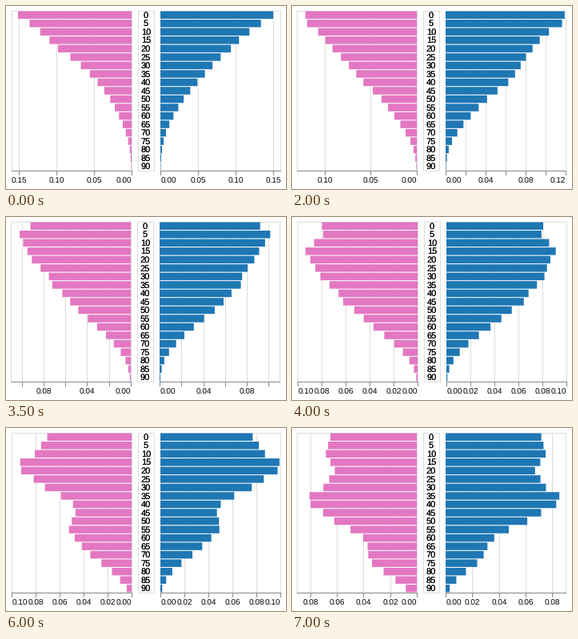
Recreate the animation shown at these times as a matplotlib script. Size 350 px wide and 229 px high, loop 7.5 s.

```python
import math

import matplotlib.pyplot as plt
import numpy as np
from matplotlib.animation import FuncAnimation
from matplotlib.patches import Rectangle

W, H, DPI = 350, 229, 64
TOP, HEIGHT, WIDTH, GAP, MIDDLE = 6, 200, 150, 8, 20
PINK, BLUE, GRID, AXIS = "#e377c2", "#1f77b4", "#dddddd", "#888888"
YEARS = [1850, 1860, 1870, 1880, *range(1900, 2001, 10)]
AGES = np.arange(0, 95, 5)
ROW = HEIGHT / len(AGES)
LABEL_W = 19.46  # width of "0.00" at 10 px

# Key points of cohort size by birth year, in thousands of women
COHORTS = {
    1770: 150, 1800: 360, 1830: 1070, 1850: 1650, 1860: 2250, 1870: 2760,
    1880: 3400, 1890: 4000, 1895: 4480, 1900: 4620, 1910: 5550, 1925: 6400,
    1930: 5950, 1935: 5500, 1940: 5700, 1945: 6850, 1950: 8400, 1960: 10700,
    1965: 10800, 1970: 9400, 1980: 8250, 1990: 9150, 2000: 8700,
}


def bell(x, center, width):
    return np.exp(-(((x - center) / width) ** 2) / 2)


def women_by_age(year):
    """Cohort size times Weibull survival, which improves after 1930."""
    born = np.exp(np.interp(year - AGES, list(COHORTS), np.log(list(COHORTS.values()))))
    gain = max(year - 1930, 0)
    alive = np.exp(-((AGES / (72 + 0.186 * gain)) ** (5.2 + 0.045 * gain)))
    missed = 0.06 * max(0, 1 - abs(year - 1930) / 60)
    return born * alive * (1 - missed * np.exp(-AGES / 8))


def sex_ratio(year):
    """Men per woman: male immigrants early on, longer female lives later."""
    late = np.clip((year - 1930) / 50, 0, 1)
    settlers = 0.11 * np.clip((1960 - year) / 60, 0, 1) * bell(AGES, 45, 14)
    youth_dip = 0.06 * np.clip((2000 - year) / 70, 0, 1) * bell(AGES, 20, 8)
    old_age = (0.27 + 0.36 * late) * (AGES / 90) ** (7 - 3.5 * late)
    return 1.04 + settlers - youth_dip - old_age - 0.0006 * late * AGES


def shares(counts):
    return counts / counts.sum()


def nice_domain(values):
    """Upper end of the scale, in hundredths."""
    top = max(values) * 100
    step = 2 if top >= 10 * math.sqrt(2) else 1
    return step * math.ceil(top / step)


plt.rcParams["font.family"] = "Liberation Sans"
plt.rcParams["text.hinting"] = "none"
fig = plt.figure(figsize=(W / DPI, H / DPI), dpi=DPI, facecolor="white")
ax = fig.add_axes([0, 0, 1, 1])
ax.set(xlim=(0, W), ylim=(H, 0))
ax.axis("off")


def rect(x, y, w, h, color):
    ax.add_patch(Rectangle((x, y), w, h, fc=color, lw=0, snap=False))


def label(x, y, s, px, align="center"):
    ax.text(x, y, s, fontsize=px * 72 / DPI, ha=align, va="baseline", color="black")


def frame(x, w):
    rect(x, TOP, w + 1, 1, GRID)
    rect(x, TOP + HEIGHT, w + 1, 1, GRID)
    rect(x, TOP, 1, HEIGHT, GRID)
    rect(x + w, TOP, 1, HEIGHT, GRID)


def panel(x, values, domain, color, mirrored):
    base = TOP + HEIGHT
    frame(x, WIDTH)
    step = 5 if domain / 4 >= math.sqrt(10) else 2
    spacing = WIDTH * step / domain
    every = 1 if spacing >= 1.5 * LABEL_W else 2
    for k in range(domain // step + 1):
        pos = round(WIDTH - k * spacing if mirrored else k * spacing)
        rect(x + pos, TOP, 1, HEIGHT, GRID)
        rect(x + pos, base, 1, 6, AXIS)
        if k % every == 0:
            align = "left" if pos == 0 else "right" if pos == WIDTH else "center"
            label(x + pos + 0.5, base + 16, f"{k * step / 100:.2f}", 10, align)
    rect(x, base, WIDTH + 1, 1, AXIS)
    for i, v in enumerate(values):
        w = v * 100 / domain * WIDTH
        rect(x + WIDTH - w if mirrored else x, TOP + (i + 0.05) * ROW, w, 0.9 * ROW, color)


def draw(i):
    for artist in [*ax.patches, *ax.texts]:
        artist.remove()
    counts = women_by_age(YEARS[i])
    women = shares(counts)
    men = shares(counts * sex_ratio(YEARS[i]))
    domain = nice_domain(women)
    left = 7 - domain % 2
    mid = left + WIDTH + GAP
    panel(left, women, domain, PINK, True)
    panel(mid + MIDDLE + GAP, men, nice_domain(men), BLUE, False)
    frame(mid, MIDDLE)
    for k, age in enumerate(AGES):
        for _ in range(2):  # one label per sex, overlaid
            label(mid + MIDDLE / 2, TOP + (k + 0.5) * ROW + 3.5, str(age), 11)
    return [*ax.patches, *ax.texts]


anim = FuncAnimation(fig, draw, frames=len(YEARS), interval=500,
                     repeat=True, repeat_delay=0, blit=False)
plt.show()
```
